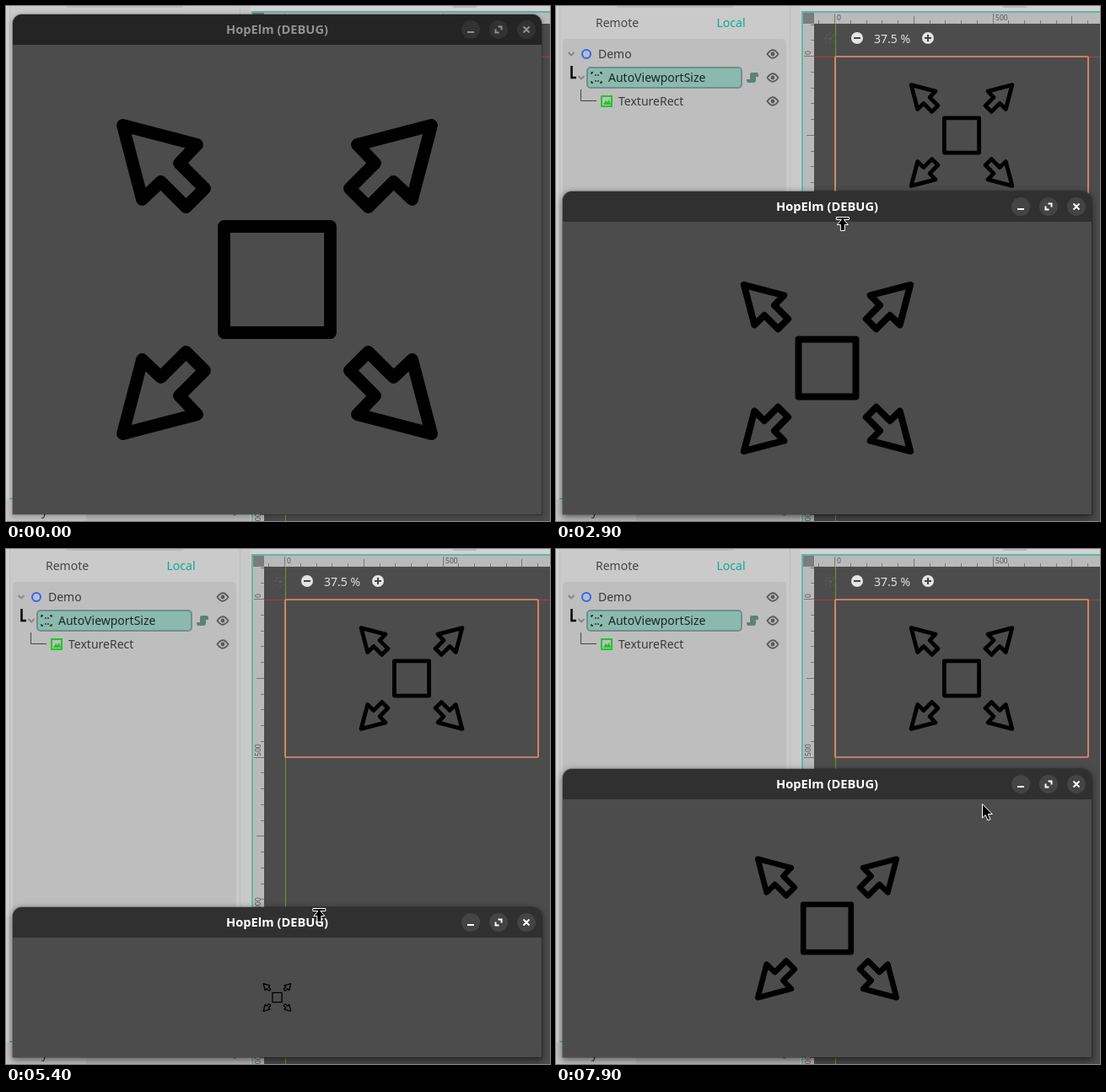
An HTML page that plays this animation: 645x611 px, repeating every 8 s.

```html
<!DOCTYPE html>
<html lang="en">
<head>
<meta charset="utf-8">
<title>Viewport resize</title>
<style>
  html, body { margin: 0; width: 100%; height: 100%; overflow: hidden; background: #4c4c4c; }
  #stage { position: relative; width: 645px; height: 611px; overflow: hidden; }
  svg { position: absolute; left: 0; top: 0; display: block; }
  text { font: 14px "Noto Sans", sans-serif; white-space: pre; }
  .tick { font-size: 8.6px; fill: #555; }
  #win { position: absolute; left: 8px; width: 627px; bottom: 8px; border-radius: 11px 11px 0 0; background: #4c4c4c; overflow: hidden; }
  #bar { position: relative; height: 36px; }
  #title { text-align: center; font: bold 14.67px/35px "Noto Sans", sans-serif; }
</style>
</head>
<body>
<div id="stage">
  <svg width="645" height="611" fill="none">
    <defs>
      <path id="arrow" d="M-183-183L-95-160L-116-138L-86-108L-108-86L-138-116L-160-95Z"/>
      <g id="icon" stroke="#000" stroke-width="14.8" stroke-linejoin="round">
        <rect x="-63" y="-63" width="126" height="126"/>
        <use href="#arrow"/>
        <use href="#arrow" transform="scale(-1 1)"/>
        <use href="#arrow" transform="scale(1 -1)"/>
        <use href="#arrow" transform="scale(-1)"/>
      </g>
      <g id="eye" stroke="#5a5a5a" stroke-width="1.8">
        <path d="M-6.5 0Q0-9.5 6.5 0Q0 9.5-6.5 0Z"/>
        <circle r="2.4" fill="#5a5a5a" stroke="none"/>
      </g>
      <path id="fold" d="M-3.5-2L0 1.5L3.5-2" stroke="#858585" stroke-width="1.8"/>
    </defs>

    <!-- scene dock -->
    <path d="M0 0H292V611H0Z" fill="#c9c9c9"/>
    <path d="M0 0H4V611H0Z" fill="#d0d0d0"/>
    <path d="M4 0H278V584H4Z" fill="#cacaca"/>
    <path d="M72 0H210V2H72Z" fill="#b9b9b9"/>
    <path d="M277.500 0V611M4.500 0V584" stroke="#bcbcbc"/>
    <path d="M4 584.500H292" stroke="#43b39b" stroke-width="1.500"/>
    <rect x="8" y="39" width="265" height="545" rx="5" fill="#bebebe"/>
    <path d="M0 585.500H290V611H0Z" fill="#c4c4c4"/>
    <path d="M95 590H289V611H95Z" fill="#b9b9b9"/>
    <text x="42" y="604" fill="#333">y</text>
    <circle cx="271" cy="603" r="2" fill="#888"/>
    <text x="47" y="25" fill="#454545">Remote</text>
    <text x="190.500" y="25" fill="#0fa98f">Local</text>

    <use href="#fold" x="18" y="57"/>
    <circle cx="36" cy="57" r="5" stroke="#2f64ff" stroke-width="2"/>
    <text x="50" y="62" fill="#3a3a3a">Demo</text>
    <rect x="37" y="73" width="183" height="24" rx="4" fill="#8cb9ae" stroke="#6f9189" stroke-width="2"/>
    <path d="M18.500 71V85H24" stroke="#000" stroke-width="2.500"/>
    <use href="#fold" x="30" y="85"/>
    <path d="M42 81V79H44M52 79H54V81M42 89V91H44M52 91H54V89M47 81V83M50 81V83M47 88V90M50 88V90" stroke="#222" stroke-width="1.300"/>
    <text x="62" y="90" fill="#1e2624">AutoViewportSize</text>
    <path d="M232 79H238Q240 79 240 82V84H237V88Q237 91 234 91H228Q226 91 226 88V87H230V81Q230 79 232 79Z" fill="#5e8177"/>
    <path d="M29.500 99V112.500H48" stroke="#444"/>
    <path d="M54 107H66V119H54Z" stroke="#1cc928" stroke-width="2"/>
    <path d="M56 117L59 112L61 114L63 111L65 117Z" fill="#1cc928"/>
    <text x="74" y="118" fill="#3a3a3a">TextureRect</text>
    <use href="#eye" x="257" y="57"/>
    <use href="#eye" x="257" y="85"/>
    <use href="#eye" x="257" y="113"/>

    <!-- 2D viewport -->
    <path d="M290 0H645V7H290Z" fill="#d2d2d2"/>
    <path d="M530 0H558V2H530Z" fill="#b9b9b9"/>
    <path d="M292 8H645V21H306V611H292Z" fill="#bababa"/>
    <path d="M293 8H306V21H293Z" fill="#7c7c7c"/>
    <path d="M306 21H645V611H306Z" fill="#4c4c4c"/>
    <path d="M645 7H292V611" stroke="#5db8a3" stroke-width="1.800"/>
    <g id="ruler" stroke="#777"></g>
    <path d="M331.500 21V611" stroke="#6f9a24"/>
    <path d="M306 60.500H645" stroke="#b93445"/>
    <rect x="331" y="60" width="300" height="187" rx="1" stroke="#e78d6c" stroke-width="1.700"/>
    <use href="#icon" transform="translate(481 153.500) scale(.327)"/>
    <path d="M325 31V45M318 38H332M320 33L330 43M330 33L320 43" stroke="#5d5d5d" stroke-dasharray="4 2"/>
    <g fill="#e4e4e4"><circle cx="357" cy="38" r="7"/><circle cx="441" cy="38" r="7"/></g>
    <path d="M353 38H361M437 38H445M441 34V42" stroke="#444" stroke-width="2"/>
    <text x="377" y="44" fill="#e0e0e0">37.5 %</text>
  </svg>

  <div id="win">
    <div id="bar">
      <div id="title">HopElm (DEBUG)</div>
      <svg width="627" height="36" fill="none">
        <g id="discs"><circle cx="543" cy="18" r="11"/><circle cx="576" cy="18" r="11"/><circle cx="609" cy="18" r="11"/></g>
        <path id="marks" stroke-width="2" d="M539 21H547M575.500 14.500H579.500V18.500M572.500 17.500V21.500H576.500M605.500 14.500L612.500 21.500M612.500 14.500L605.500 21.500"/>
      </svg>
    </div>
  </div>

  <svg width="645" height="611" fill="none">
    <use id="view" href="#icon"/>
    <g id="cursor" fill="#000" stroke="#fff" stroke-linejoin="round">
      <path id="resize" d="M-7.500 .5H7.500V3.500H1.500L6.500 9.500H2.500V16.500H-2.500V9.500H-6.500L-1.500 3.500H-7.500Z"/>
      <path id="pointer" d="M.5 .5V17L4.300 13.500L7 20L10 18.700L7.300 12.500H12.300Z"/>
    </g>
  </svg>
</div>
<script>
const $ = id => document.getElementById(id);
const LOOP = 8000, STEP = 100, LAG = 220, BOTTOM = 603, BAR = 36;

const clamp = u => Math.min(1, Math.max(0, u));
const sine = u => (1 - Math.cos(Math.PI * u)) / 2;
const quadIn = u => u * u;
const cubicOut = u => 1 - (1 - u) ** 3;

const move = (at, time, dx, dy, easeY = sine, easeX = easeY) => t => {
  const u = clamp((t - at) / time);
  return [dx * easeX(u), dy * easeY(u)];
};
const path = (x, y, ...moves) => t => moves.reduce((p, m) => {
  const [dx, dy] = m(t);
  return [p[0] + dx, p[1] + dy];
}, [x, y]);

// The hand drags the top edge; the window follows it a little later.
const grip = path(311, 8,
  move(1360, 1880, 43, 263, sine, quadIn),
  move(3640, 2200, 17.5, 156, cubicOut),
  move(5550, 1500, 9.5, -154),
  move(7200, 250, 0, -14));
// Coming in before the drags and leaving after them.
const stray = path(-11, -30,
  move(300, 400, 3, 46),
  move(750, 250, 8, -16),
  move(7600, 300, 124, 43));

const gray = (a, b, p) => `rgb(${Array(3).fill(Math.round(a + (b - a) * p))})`;

function drawRuler() {
  let marks = '', labels = '';
  for (let i = -2; i < 32; i++) {
    const len = i % 10 === 0 ? 12 : i % 5 === 0 ? 9 : 4;
    const x = Math.round(331 + i * 18.75) - .5, y = Math.round(60 + i * 18.75) - .5;
    if (x > 306) marks += `M${x} 21v${-len}`;
    if (y > 21) marks += `M306 ${y}h${-len}`;
    if (i >= 0 && i % 10 === 0) {
      const label = at => `<text class="tick" stroke="none" transform="${at}">${i * 50}</text>`;
      labels += label(`translate(${x + 2.5} 17)`) + label(`translate(302 ${y - 1.5}) rotate(-90)`);
    }
  }
  $('ruler').innerHTML = `<path d="${marks}"/>${labels}`;
}

function draw(t) {
  const top = Math.round(grip(t - LAG)[1]) + 2;
  const height = BOTTOM - BAR - top;
  const focus = clamp((t - 1100) / 300);
  $('win').style.height = BOTTOM - top + 'px';
  $('win').style.boxShadow = `0 3px 9px 1px rgba(0,0,0,${.5 * focus}),
    0 2px 6px 2px rgba(0,0,0,${.2 * (1 - focus)}), 0 0 0 1px rgba(0,0,0,.2)`;
  $('bar').style.background = gray(36, 48, focus);
  $('title').style.color = gray(145, 255, focus);
  $('discs').setAttribute('fill', gray(50, 68, focus));
  $('marks').setAttribute('stroke', gray(145, 255, focus));

  const scale = .8365 * (height - 101.5) / 381;
  $('view').setAttribute('transform', `translate(321.5 ${BOTTOM - height / 2}) scale(${scale})`);

  const [x, y] = grip(t), [dx, dy] = stray(t);
  const pointing = t >= 500 && t < 900 || t >= 7700;
  $('cursor').setAttribute('transform', `translate(${x + dx} ${Math.round(y + dy)})`);
  $('pointer').style.display = pointing ? '' : 'none';
  $('resize').style.display = pointing ? 'none' : '';
}

const start = performance.now();
function tick() {
  const t = (performance.now() - start) % LOOP;
  draw(Math.floor(t / STEP) * STEP);
  requestAnimationFrame(tick);
}
drawRuler();
tick();
</script>
</body>
</html>
```
